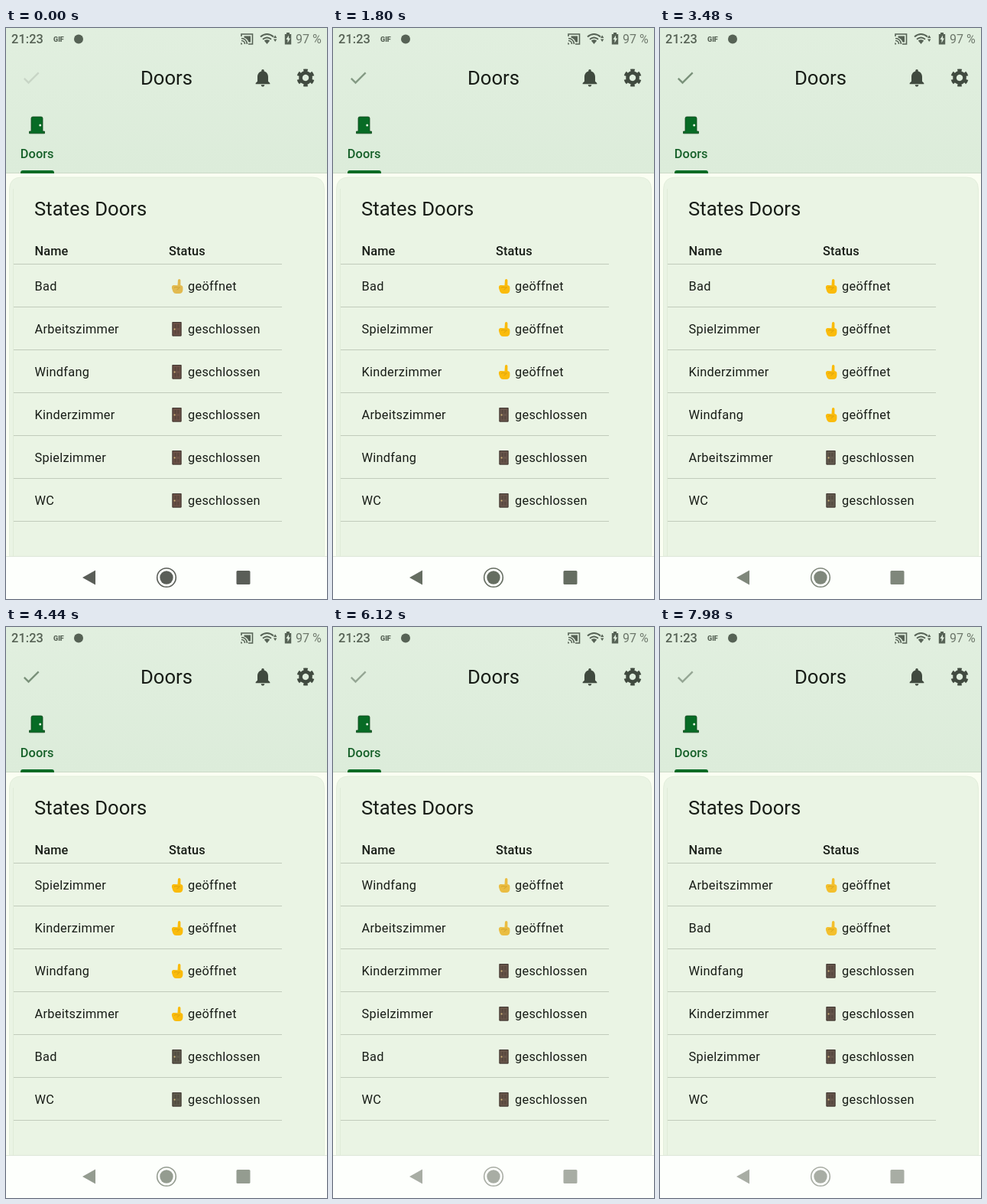
An HTML page for the animation above (8 s loop, 420 by 746 pixels).

```html
<!DOCTYPE html>
<html lang="en">
<head>
<meta charset="utf-8">
<title>Doors</title>
<style>
html, body { margin: 0; width: 100%; height: 100%; overflow: hidden; background: #fdfffc; }
svg { display: block; width: 420px; height: 746px; }
text { font: 400 16.33px Roboto, sans-serif; fill: #181d17; }
.title { font-size: 25.67px; }
.label { font-weight: 500; letter-spacing: .1px; }
.cell { letter-spacing: .29px; }
.bar text { fill: #566255; }
.hand, .door, .nav, .check { animation: 8s linear infinite; fill: currentColor; }
.hand { animation-name: hand; }
.door { animation-name: door; }
.nav { animation-name: nav; }
.check { animation-name: check; }
.off { visibility: hidden; }
@keyframes hand {
  0% { color: #e2ba50; }
  10%, 70% { color: #fabb0b; }
  78%, 90% { color: #e6be4e; }
  100% { color: #f3bf2c; }
}
@keyframes door {
  0%, 13% { color: #6b5046; }
  32% { color: #685a50; }
  56% { color: #5e5a4c; }
  67% { color: #6a5648; }
  100% { color: #64544a; }
}
@keyframes nav {
  0% { color: #5a5e58; }
  13% { color: #5f665c; }
  32% { color: #6a7366; }
  56% { color: #959d91; }
  67%, 100% { color: #a8ada4; }
}
@keyframes check {
  0% { color: #c8d5c6; }
  6%, 13% { color: #8fa38e; }
  32%, 62% { color: #7a917a; }
  65%, 67% { color: #cbdac9; }
  72%, 100% { color: #95a694; }
}
</style>
</head>
<body>
<svg viewBox="0 0 420 746">
  <defs>
    <linearGradient id="head" x2="0" y2="1">
      <stop stop-color="#e1efdf"/>
      <stop offset="1" stop-color="#dcecda"/>
    </linearGradient>
    <g id="hand">
      <path d="M8.5 1.6Q8.5 0 10.2 0t1.7 1.6V8q3 .5 3 3v3q0 5-5 5H6q-2.600 0-4-2.500L.8 13Q.2 11 .6 9.500 1.200 7.800 3 8l5 .2z"/>
      <path d="M3.300 11.500q2.200-1.700 4.700-.6l3.500.1M7 14l3-2" fill="none" stroke="#b8860f" stroke-opacity=".55" stroke-width=".8"/>
    </g>
    <g id="door">
      <path d="M0 0h12v18.500H0z"/>
      <path d="M.5.5h11v17.500H.5z" fill="none" stroke="#403833"/>
      <path d="M3 3h2.300v5H3zm3.700 0H9v5H6.700zM3 11h2.300v4.500H3zm3.700 0H9v4.500H6.700z" fill="#3b302b" fill-opacity=".35"/>
      <circle cx="3" cy="9.500" r="1" fill="#d4b878"/>
    </g>
  </defs>

  <path fill="#fafef2" d="M0 190h420v500H0z"/>
  <path fill="url(#head)" d="M0 0h420v190H0z"/>
  <path stroke="#cbd9c7" d="M0 189.500h420"/>

  <g class="bar" fill="#566255">
    <text class="label" x="7" y="20">21:23</text>
    <text x="62" y="18" style="font-size:9px;font-weight:900">GIF</text>
    <circle cx="95" cy="14.500" r="6"/>
    <g fill="none" stroke="#566255" stroke-width="1.600">
      <path d="M308 11V8h14.500v13H317M308 13.500a7.500 7.500 0 0 1 7.500 7.500M308 16.500a4.500 4.500 0 0 1 4.500 4.500"/>
      <path d="M333 11.500q8.500-7 17 0M336 14.800q5.500-4.500 11 0" stroke-width="2"/>
    </g>
    <path d="M311.500 10.500h8.500v8h-2.500q-1.500-4.500-6-6zM307.200 19.300a2 2 0 0 1 2 2.200h-2zM337.800 16.500q3.700-2.500 7.400 0L341.500 21zM350 13l2.200-3.500 2.200 3.500zM350 14.500h4.400L352.200 18z"/>
    <path d="M367 6h4v2h2.200v13.500h-8.400V8h2.200z"/>
    <path d="M370 9.500l-3.500 5.500h2v4.500l3.500-6h-2z" fill="#e0eede"/>
    <text x="379" y="20" style="font-size:16px;fill:#6c766a">97 %</text>
  </g>

  <g class="check">
    <path transform="translate(19 51) scale(1.167)" d="M9 16.170 4.830 12l-1.420 1.410L9 19 21 7l-1.410-1.410z"/>
  </g>
  <text class="title" x="210" y="73.500" text-anchor="middle">Doors</text>
  <g fill="#404a3f" stroke="#404a3f">
    <path stroke="none" transform="translate(322 51) scale(1.167)" d="M12 22a2 2 0 0 0 2-2h-4a2 2 0 0 0 2 2zm6-6v-5c0-3.070-1.640-5.640-4.500-6.320V4a1.500 1.500 0 0 0-3 0v.68C7.630 5.360 6 7.920 6 11v5l-2 2v1h16v-1z"/>
    <g transform="translate(392 65) rotate(14.500) scale(1.167)" fill="none">
      <circle r="5.600" stroke-width="4"/>
      <circle r="8.500" stroke-width="2.900" pathLength="60" stroke-dasharray="5.200 4.800"/>
    </g>
  </g>

  <g fill="#076b25">
    <path d="M33 135v-17q0-2 2-2h11q2 0 2 2v17h2.500v2.800h-20V135z" stroke="#15481f" stroke-width=".8"/>
    <circle cx="44.700" cy="127" r="1.500" fill="#e5f3e2"/>
    <text class="label" x="40.700" y="170" text-anchor="middle" style="fill:#17612a">Doors</text>
    <path d="M19 190v-1q0-3 3-3h38q3 0 3 3v1z"/>
  </g>

  <path d="M4.500 690V211q0-16 16-16h380q16 0 16 16v479z" fill="#eaf4e4" stroke="#e3eedc"/>
  <path d="M9.500 210v480" stroke="#e0ebd9"/>
  <text class="title" x="37" y="245">States Doors</text>
  <text class="label" x="37.500" y="297">Name</text>
  <text class="label" x="213" y="297">Status</text>
  <path id="rules" stroke="#c1cbbb" stroke-width="1.200"/>
  <g id="rows"></g>

  <path fill="#fdfffc" d="M0 690h420v56H0z"/>
  <path stroke="#e0e8dc" d="M0 690.500h420"/>
  <g class="nav">
    <path d="M100 718l17-9.500v19z"/>
    <circle cx="210" cy="718" r="8.700"/>
    <circle cx="210" cy="718" r="12.300" fill="none" stroke="currentColor" stroke-width="1.600"/>
    <rect x="301.500" y="709" width="18" height="18" rx="1.500"/>
  </g>
</svg>
<script>
const LOOP = 8000, ROW = 56;
const rooms = ['Bad', 'Arbeitszimmer', 'Windfang', 'Kinderzimmer', 'Spielzimmer', 'WC'];
const toggles = [
  [600, 'Spielzimmer'], [1750, 'Kinderzimmer'], [2900, 'Windfang'],
  [3500, 'Arbeitszimmer'], [4100, 'Bad'], [5000, 'Spielzimmer'],
  [6050, 'Kinderzimmer'], [7100, 'Windfang'], [7600, 'Bad']
];

document.getElementById('rules').setAttribute('d',
  Array.from({ length: 7 }, (_, i) => `M10 ${308.5 + i * ROW}H361`).join(''));

const rowBox = document.getElementById('rows');
rowBox.innerHTML = rooms.map((_, i) => `
  <g transform="translate(0 ${337 + i * ROW})">
    <text class="cell" x="37.500" y="6"></text>
    <use class="hand" href="#hand" x="216.500" y="-9"/>
    <use class="door" href="#door" x="217.500" y="-9"/>
    <text class="cell" x="238" y="6"></text>
  </g>`).join('');

// A toggled room always lands at the border between open and closed rooms.
function stateAt(time) {
  let order = [...rooms];
  const open = new Set(['Bad']);
  for (const [at, room] of toggles) {
    if (at > time) break;
    const opening = !open.delete(room);
    order = order.filter(r => r !== room);
    order.splice(open.size, 0, room);
    if (opening) open.add(room);
  }
  return { order, open };
}

let shown = -1;
function draw() {
  const time = performance.now() % LOOP;
  const step = toggles.filter(([at]) => at <= time).length;
  if (step !== shown) {
    shown = step;
    const { order, open } = stateAt(time);
    order.forEach((room, i) => {
      const [name, hand, door, status] = rowBox.children[i].children;
      const isOpen = open.has(room);
      name.textContent = room;
      status.textContent = isOpen ? 'geöffnet' : 'geschlossen';
      hand.classList.toggle('off', !isOpen);
      door.classList.toggle('off', isOpen);
    });
  }
  requestAnimationFrame(draw);
}
draw();
</script>
</body>
</html>
```
